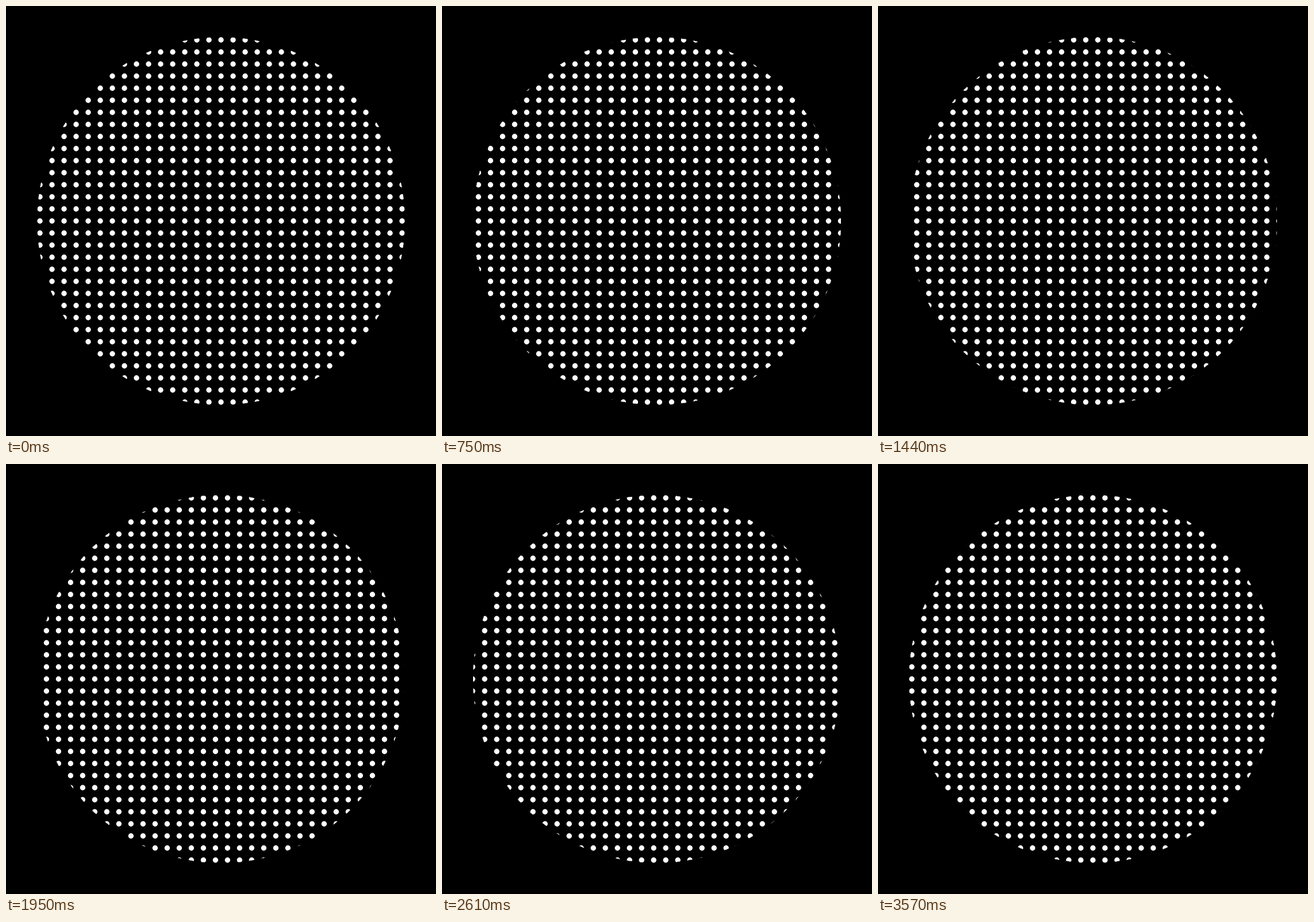
Write an HTML page with a canvas that moves like this. It is 748 px wide and 748 px high and loops after 3600 ms.

```html
<!DOCTYPE html>
<html lang="en">
<head>
<meta charset="utf-8">
<title>Drifting dots</title>
<style>
  html, body { margin: 0; width: 100%; height: 100%; overflow: hidden; background: #000; }
  canvas { display: block; }
</style>
</head>
<body>
<canvas id="stage" width="748" height="748"></canvas>
<script>
  const SIZE = 748, MID = SIZE / 2;
  const RADIUS = 320, PITCH = 21, DOT = 4.7, LOOP = 3600;
  const COUNT = Math.ceil(RADIUS / PITCH);
  const ctx = document.getElementById('stage').getContext('2d');

  // The round window stays put while the grid slides under it.
  ctx.beginPath();
  ctx.arc(MID, MID, RADIUS, 0, Math.PI * 2);
  ctx.clip();

  function draw(time) {
    const shift = PITCH * (time % LOOP) / LOOP;
    ctx.fillStyle = '#000';
    ctx.fillRect(0, 0, SIZE, SIZE);
    ctx.fillStyle = '#fff';
    ctx.beginPath();
    for (let row = -COUNT; row <= COUNT; row++) {
      for (let col = -COUNT - 1; col <= COUNT; col++) {
        const x = MID + col * PITCH + shift, y = MID + row * PITCH;
        ctx.moveTo(x + DOT, y);
        ctx.arc(x, y, DOT, 0, Math.PI * 2);
      }
    }
    ctx.fill();
  }

  const start = performance.now();
  function tick() {
    draw(performance.now() - start);
    requestAnimationFrame(tick);
  }
  tick();
</script>
</body>
</html>
```
